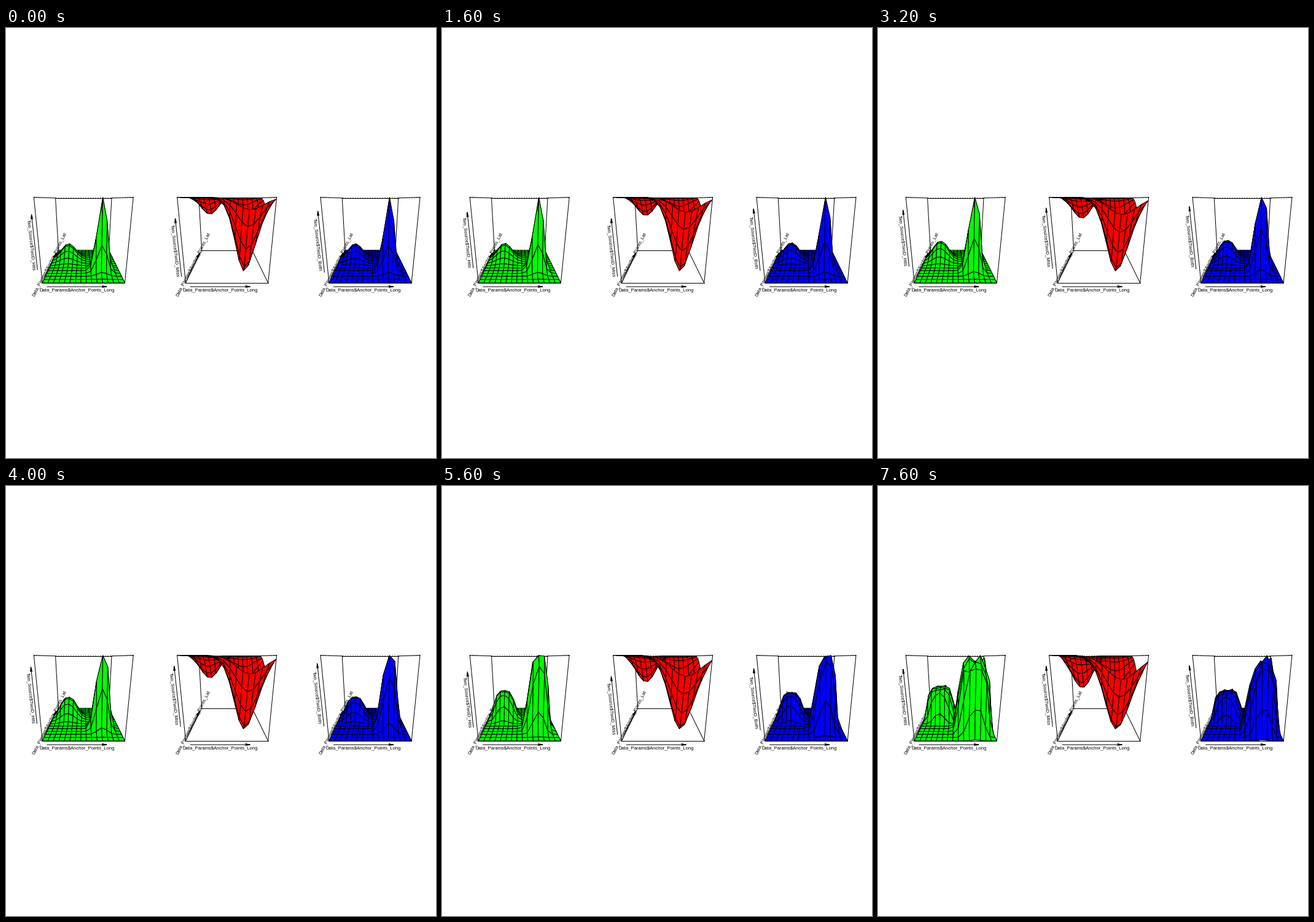
A matplotlib script that plays this animation: 700x700 px, repeating every 8 s.

```python
import numpy as np
import matplotlib.pyplot as plt
from matplotlib.animation import FuncAnimation
from matplotlib.collections import PolyCollection

SIZE, DPI, FRAMES, INTERVAL = 700, 100, 20, 400
PX = 72 / DPI
PHI = np.radians(15)
EYE, SCALE, CENTER_Y = 3.732, 203, 332.8
N = 16
NEAR, FAR = -1.06, -1.12  # offsets of axis arrows and axis labels

GRID_X, GRID_Y = np.meshgrid(np.linspace(-1, 1, N), np.linspace(-1, 1, N))
ROUGH = np.random.default_rng(4).random((N, N))

PANELS = [
    dict(cx=126.3, color="#00ff00", label="Two_Source$TwoD_Hits", span=0.63),
    dict(cx=359.6, color="#ff0000", label="Two_Source$TwoD_Miss", span=0.68),
    dict(cx=593.0, color="#0000ff", label="Two_Source$TwoD_Both", span=0.70),
]


def project(x, y, z, cx):
    """Perspective view of the [-1, 1] cube; returns stage points and depth."""
    depth = EYE - z * np.sin(PHI) + y * np.cos(PHI)
    up = z * np.cos(PHI) + y * np.sin(PHI)
    return np.stack([cx + SCALE * x / depth, CENTER_Y - SCALE * up / depth], -1), depth


def point(x, y, z, cx):
    return project(x, y, z, cx)[0]


def bump(x, y, size, power=2.0):
    return np.exp(-(np.hypot(GRID_X - x, GRID_Y - y) / size) ** power)


def peaks(frame, pace, growth, hill_gain, slope):
    """Two peaks that widen into rough plateaus; slope lowers the left flank."""
    t = frame / (FRAMES - 1)
    ease = t ** pace
    power = 2 + 4.5 * ease
    noise = 0.2 * t ** 5 * ROUGH
    flank = slope * ease * np.clip(0.47 - GRID_X, 0, 0.5)
    main = bump(0.49, -0.42, 0.184 + growth * ease, power) * (1 - noise) * (1 - flank)
    hill = bump(-0.5, 0.27, 0.33 + 0.13 * ease, power) * (1 - 0.4 * noise)
    height = 0.27 + hill_gain * min(1, frame / 16) ** pace
    return main / main.max() + height * hill


def wells(frame):
    t = frame / (FRAMES - 1)
    size = 0.36 + 0.08 * t
    depth = 0.245 + 0.245 * t ** 1.6
    return bump(0.49, -0.48, size) + depth * bump(-0.52, 0.27, 0.9 * size, 2.2)


def heights(index, frame):
    if index == 1:
        data = -wells(frame)
    elif index == 0:
        data = peaks(frame, pace=2.8, growth=0.28, hill_gain=0.27, slope=0)
    else:
        data = peaks(frame, pace=2.0, growth=0.28, hill_gain=0.20, slope=1.2)
    return 2 * data / np.abs(data).max() - np.sign(data.sum())


def axis_middle(index, frame):
    """Ticks drift with the data range, then jump to the next round value."""
    step = frame % 13
    if index == 1:
        return 0.11 if step >= 6 else -0.10
    return 0.03 + 0.011 * step


def facets(index, frame):
    pts, depth = project(GRID_X, GRID_Y, heights(index, frame), PANELS[index]["cx"])

    def corners(a):
        return np.stack([a[:-1, :-1], a[:-1, 1:], a[1:, 1:], a[1:, :-1]], 2)

    order = np.argsort(-corners(depth).mean(2).ravel(), kind="stable")
    return corners(pts).reshape(-1, 4, 2)[order]


def arrow_path(start, end, length=7.2, angle=np.radians(10)):
    back = (start - end) / np.hypot(*(start - end)) * length
    c, s = np.cos(angle), np.sin(angle)
    left = end + np.array([[c, -s], [s, c]]) @ back
    right = end + np.array([[c, s], [-s, c]]) @ back
    return np.array([start, end, left, end, right])


def line(points, zorder, style="-"):
    return ax.plot(*np.array(points).T, color="black", lw=PX, ls=style, zorder=zorder,
                   solid_joinstyle="round")[0]


def label(text, pos, angle):
    return ax.text(*pos, text, fontsize=7.6 * PX, family="Liberation Sans", ha="center",
                   va="center", rotation=angle, rotation_mode="anchor", zorder=2)


def slant(start, end):
    dx, dy = end - start
    return np.degrees(np.arctan2(-dy, dx))


def draw_box(cx):
    c = [-1, 1]
    edges = [((x, y, -1), (x, y, 1)) for x in c for y in c]
    edges += [((x, -1, z), (x, 1, z)) for x in c for z in c]
    edges += [((-1, y, z), (1, y, z)) for y in c for z in c]
    for a, b in edges:
        ends = [point(*a, cx), point(*b, cx)]
        if a[1:] == b[1:] == (-1, 1):
            line(ends, 4, (0, (1, 3)))  # the edge nearest the eye is dotted
        else:
            line(ends, 1)


def draw_floor_axes(cx):
    a, b = point(-.873, NEAR, NEAR, cx), point(.553, NEAR, NEAR, cx)
    line(arrow_path(a, b), 2)
    label("Data_Params$Anchor_Points_Long", point(-.16, FAR, FAR, cx), 0)
    a, b = point(NEAR, -.66, NEAR, cx), point(NEAR, .848, NEAR, cx)
    line(arrow_path(a, b), 2)
    label("Data_Params$Anchor_Points_Lat", point(FAR, .093, FAR, cx), slant(a, b))


fig = plt.figure(figsize=(SIZE / DPI, SIZE / DPI), dpi=DPI, facecolor="white")
ax = fig.add_axes([0, 0, 1, 1])
ax.set_xlim(0, SIZE)
ax.set_ylim(SIZE, 0)
ax.axis("off")

for p in PANELS:
    draw_box(p["cx"])
    draw_floor_axes(p["cx"])
    p["arrow"] = line([(0, 0), (1, 1)], 2)
    p["text"] = label(p["label"], (0, 0), 0)
    p["surface"] = PolyCollection([], facecolors=p["color"], edgecolors="black",
                                  linewidths=PX, joinstyle="round", zorder=3)
    ax.add_collection(p["surface"], autolim=False)


def update(frame):
    artists = []
    for i, p in enumerate(PANELS):
        middle = axis_middle(i, frame)
        a = point(NEAR, NEAR, middle - p["span"], p["cx"])
        b = point(NEAR, NEAR, middle + p["span"], p["cx"])
        p["arrow"].set_data(*arrow_path(a, b).T)
        p["text"].set_position(point(FAR, FAR, middle, p["cx"]))
        p["text"].set_rotation(slant(b, a))
        p["surface"].set_verts(facets(i, frame))
        artists += [p["arrow"], p["text"], p["surface"]]
    return artists


anim = FuncAnimation(fig, update, frames=FRAMES, interval=INTERVAL,
                     init_func=lambda: update(0), repeat=True, repeat_delay=0)
plt.show()
```
